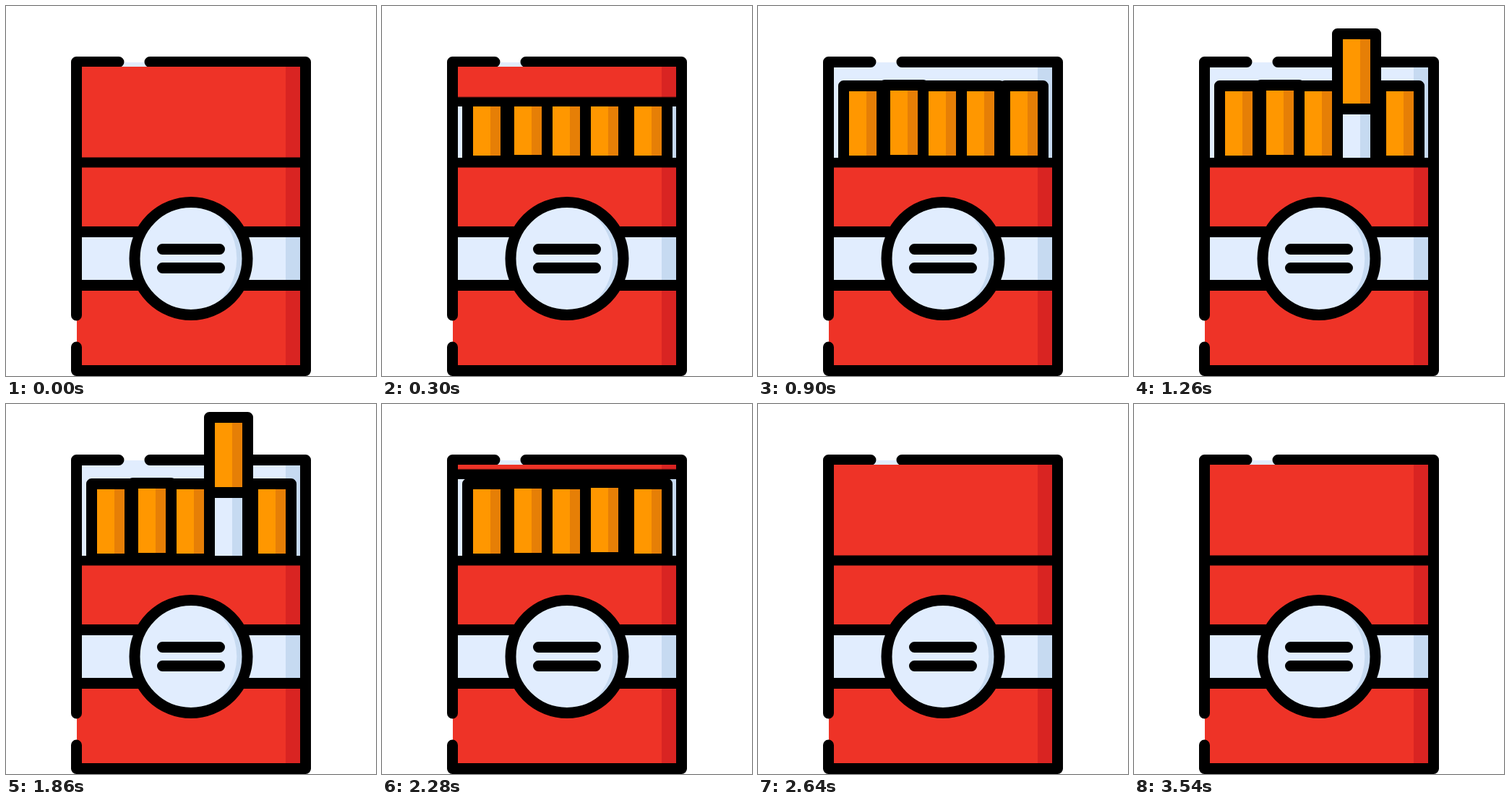
Animation of 512 by 512 pixels, one loop 3.57 s. Source, as an HTML page:

```html
<!DOCTYPE html>
<html lang="en">
<head>
<meta charset="utf-8">
<title>Opening pack</title>
<style>
  html, body { margin: 0; width: 100%; height: 100%; overflow: hidden; background: #fff; }
  svg { display: block; width: 100%; height: 100%; }
  .line { fill: none; stroke: #000; stroke-width: 15; stroke-linecap: round; stroke-linejoin: round; }
  .red { fill: #ee3327; }
  .red-shade { fill: #d92422; }
  .pale { fill: #e1edfe; }
  .pale-shade { fill: #c6daf1; }
  .orange { fill: #ff9700; }
  .orange-shade { fill: #e67f06; }
</style>
</head>
<body>
<svg viewBox="0 0 512 512">
  <defs>
    <clipPath id="above-front"><path d="M0 0H512V216H0z"/></clipPath>
    <clipPath id="opening"><path d="M105 84.5H407V224H105z"/></clipPath>
    <g id="stick">
      <path class="orange" d="M0 0H38V89H0z"/>
      <path class="orange-shade" d="M24 0H38V89H24z"/>
      <path class="pale" d="M0 96H38V200H0z"/>
      <path class="pale-shade" d="M24 96H38V200H24z"/>
      <path class="line" d="M-7.5 200V-7.5H45.5V200M-7.5 96.5H45.5"/>
    </g>
  </defs>

  <!-- back and front panels -->
  <path class="pale" d="M98 78H407V216H98z"/>
  <path class="pale-shade" d="M387 78H407V216H387z"/>
  <path class="red" d="M98 216H407V504H98z"/>
  <path class="red-shade" d="M387 216H407V504H387z"/>
  <path class="pale" d="M98 312H407V386H98z"/>
  <path class="pale-shade" d="M387 312H407V386H387z"/>
  <path class="line" d="M97.5 428V77.5H156M199 77.5H414.5V504.5H97.5V472"/>

  <g id="sticks" clip-path="url(#above-front)"></g>

  <g clip-path="url(#opening)">
    <g id="lid">
      <path class="red" d="M105 60H407V212H105z"/>
      <path class="red-shade" d="M387 60H407V212H387z"/>
      <path d="M105 209.5H407V223H105z"/>
    </g>
  </g>

  <!-- front lines and badge -->
  <path d="M98 210H414V223.500H98z"/>
  <path class="line" d="M98 312.500H414M98 386.500H414"/>
  <circle class="pale-shade" cx="256" cy="349.500" r="78"/>
  <path class="pale" d="M270 273A78 78 0 1 0 270 426A84 84 0 0 0 270 273z"/>
  <circle class="line" cx="256" cy="349.500" r="78"/>
  <path class="line" d="M216.500 336.500H295.500M216.500 362.500H295.500"/>
</svg>
<script>
  const LOOP = 3570, TICK = 30;
  const sticks = document.getElementById('sticks');

  function addStick(x, y) {
    const use = document.createElementNS('http://www.w3.org/2000/svg', 'use');
    use.setAttribute('href', '#stick');
    use.setAttribute('x', x);
    use.setAttribute('y', y);
    return sticks.appendChild(use);
  }

  // Each key is [time in ms, vertical shift]; movement advances once per tick.
  function slide(element, keys) {
    const frames = keys.map(([time, shift], i) => {
      const next = keys[i + 1] || [LOOP];
      const count = Math.max(1, Math.round((next[0] - time) / TICK));
      return {
        offset: time / LOOP,
        transform: `translateY(${shift}px)`,
        easing: `steps(${count}, end)`
      };
    });
    element.animate(frames, { duration: LOOP, iterations: Infinity });
  }

  [[126, 118], [183, 117], [236, 118], [349, 118]].forEach(([x, y]) => addStick(x, y));
  const pulled = addStick(289, 118);

  slide(document.getElementById('lid'), [
    [0, 0], [510, -142], [2190, -149], [2640, 0], [LOOP, 0]
  ]);
  slide(pulled, [
    [0, 0], [900, 0], [1350, -90], [1860, -92], [1920, -92], [2130, -2], [LOOP, -2]
  ]);
</script>
</body>
</html>
```
